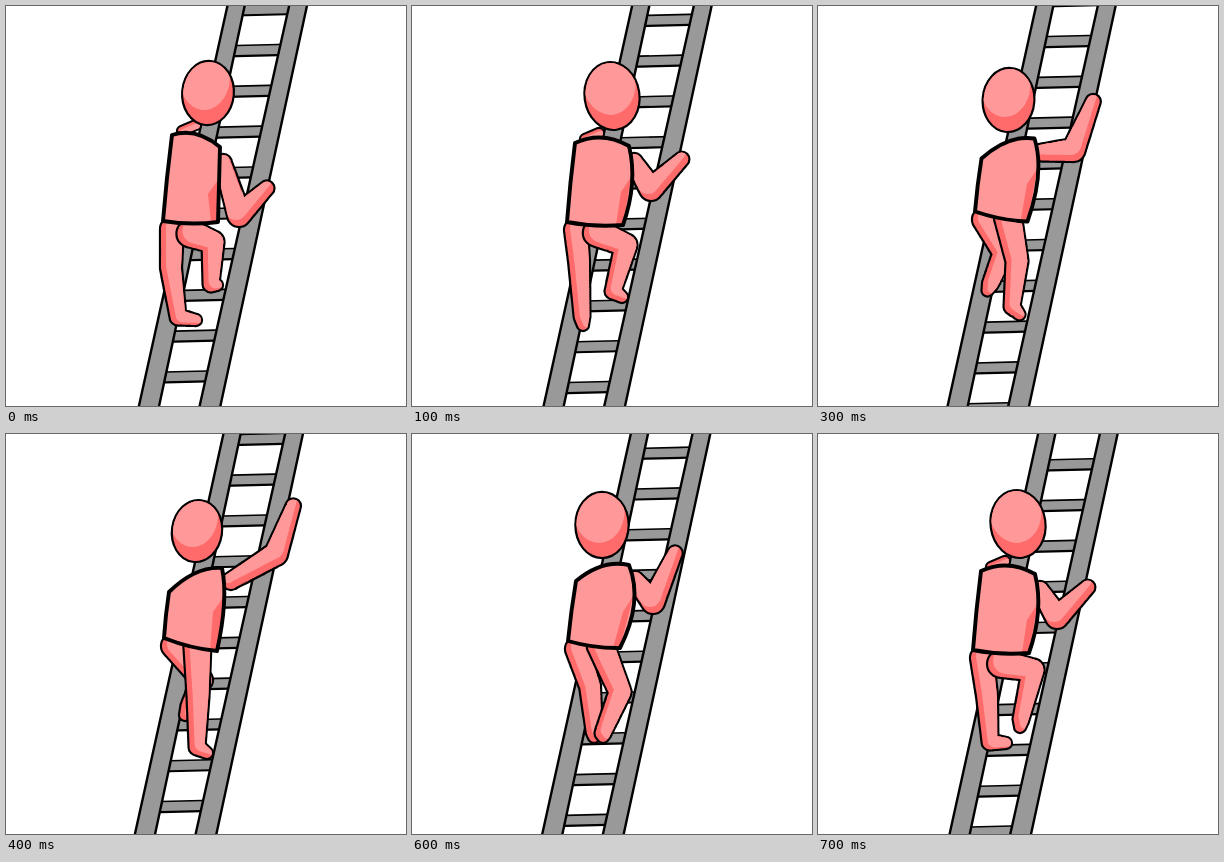
Write an HTML page that moves like this. It is 400 by 400 pixels and loops after 0.8 s.

```html
<!DOCTYPE html>
<html lang="en">
<head>
<meta charset="utf-8">
<title>Climbing a ladder</title>
<style>
  html, body { margin: 0; width: 100%; height: 100%; overflow: hidden; background: #fff; }
  #stage { position: relative; width: 400px; height: 400px; overflow: hidden; }
  #strip { position: absolute; left: 0; top: 0; display: block; animation: run .8s steps(8) infinite; }
  @keyframes run { to { transform: translateX(-3200px); } }
</style>
</head>
<body>
<div id="stage"><svg id="strip" width="3200" height="400" viewBox="0 0 3200 400" stroke-linejoin="round" stroke-linecap="round"></svg></div>
<script>
const LIGHT = '#ff9999', DARK = '#ff6a6a', GREY = '#999', INK = 4.3, GAP = 40.8;

// Upper body, from hands low to hands high.
const bodies = [
  { head: [202, 87, 31, 5], arm: [[217, 157], [233, 209], [262, 181]],
    torso: [[166, 129], [214, 141], [213, 180], [212, 216], [157, 215]] },
  { head: [200, 90, 33, -8], arm: [[222, 156], [239, 183], [271, 152]],
    torso: [[163, 137], [217, 140], [220, 178], [211, 219], [155, 216]] },
  { head: [190, 91, 32, 0], arm: [[223, 146], [241, 168], [264, 117]],
    torso: [[164, 147], [217, 131], [222, 170], [208, 214], [156, 207]] },
  { head: [191, 97, 30, 8], arm: [[225, 147], [270, 120], [288, 70]],
    torso: [[163, 158], [216, 134], [218, 170], [211, 217], [158, 204]] }
];

// Knee, ankle and toe of the left and the right leg.
const legs = [
  [[[165, 262], [172, 311], [190, 314]], [[207, 236], [205, 278], [211, 279]]],
  [[[167, 255], [170, 310], [171, 319]], [[214, 239], [201, 285], [210, 291]]],
  [[[175, 248], [162, 283], [160, 288]], [[206, 248], [197, 288], [202, 298]]],
  [[[196, 246], [183, 272], [179, 281]], [[192, 262], [191, 313], [201, 319]]],
  [[[178, 252], [182, 297], [182, 303]], [[208, 258], [191, 299], [191, 303]]],
  [[[169, 262], [172, 308], [188, 309]], [[215, 236], [203, 285], [202, 293]]]
];

let clips = 0;

// Blends numbers, or arrays and objects of them.
function mix(a, b, t) {
  if (typeof a === 'number') return a + (b - a) * t;
  if (Array.isArray(a)) return a.map((v, i) => mix(v, b[i], t));
  return Object.fromEntries(Object.keys(a).map(k => [k, mix(a[k], b[k], t)]));
}
const pose = (keys, at) => mix(keys[Math.floor(at)], keys[Math.ceil(at)], at % 1);
const move = ([x, y], dx, dy) => [x + dx, y + dy];
const line = (d, w) => `<path d="${d}" fill="none" stroke="#000" stroke-width="${w}"/>`;

// Outline, dark fill, and a shifted light copy that leaves a shaded edge.
function solid(d, dx, dy) {
  const id = 'c' + clips++;
  return `<clipPath id="${id}"><path d="${d}"/></clipPath>${line(d, INK)}<path d="${d}" fill="${DARK}"/>` +
    `<g clip-path="url(#${id})"><path d="${d}" fill="${LIGHT}" transform="translate(${dx} ${dy})"/></g>`;
}

const oval = (x, y, rx, ry, tilt = 0) => {
  const a = tilt * Math.PI / 180, c = rx * Math.cos(a), s = rx * Math.sin(a);
  return `M${x - c} ${y - s}a${rx} ${ry} ${tilt} 1 1 ${2 * c} ${2 * s}a${rx} ${ry} ${tilt} 1 1 ${-2 * c} ${-2 * s}Z`;
};

// Tapered limb: discs along the joints, merged into one silhouette.
function limb(joints, radii, dx, dy) {
  let d = '';
  for (let t = 0; t <= joints.length - 1; t += 1 / 24)
    d += oval(...pose(joints, t), pose(radii, t), pose(radii, t));
  return solid(d, dx, dy);
}

function ladder(lean, shift) {
  const left = y => 230 - .2175 * y + lean, right = y => 292 - .22 * y + lean;
  let s = '';
  for (let y = 3.5 + shift % GAP - GAP; y < 410; y += GAP) {
    const a = left(y), b = right(y);
    s += `<path d="M${a} ${y - 4.5}L${b} ${y - 6}V${y + 4.5}L${a} ${y + 6}Z" fill="${GREY}"/>` +
      line(`M${a} ${y - 4.5}L${b} ${y - 6}`, 1.6) + line(`M${a} ${y + 6}L${b} ${y + 4.5}`, 2.2);
  }
  for (const [edge, w] of [[left, 8.6], [right, 8.9]])
    s += `<path d="M${edge(-4) - w} -4h${2 * w}L${edge(404) + w + 1.5} 404h${-2 * w - 3}Z"
      fill="${GREY}" stroke="#000" stroke-width="2.4"/>`;
  return s;
}

function torso([shL, shR, waist, hipR, hipL]) {
  const top = move(mix(shL, shR, .5), 0, -14), hem = move(mix(hipL, hipR, .5), 0, 4);
  const side = mix(mix(shR, hipR, .5), waist, 2);
  const d = `M${shL}Q${top} ${shR}Q${side} ${hipR}Q${hem} ${hipL}Q${move(mix(hipL, shL, .5), -1, 0)} ${shL}Z`;
  const shade = [mix(shR, waist, .8), hipR, move(hipR, -7, 0), move(waist, -11, 8)];
  return `<path d="${d}" fill="${LIGHT}"/><path d="M${shade.join('L')}Z" fill="${DARK}"/>` + line(d, INK - .4);
}

function climber(reach, stride) {
  const body = pose(bodies, reach), [legL, legR] = pose(legs, stride);
  const [shL, , , hipR, hipL] = body.torso, [x, y, r, tilt] = body.head;
  const lift = Math.max(0, 248 - legR[0][1]);   // a raised knee swings the hip down and in
  const startL = move(hipL, 9, 8), startR = move(mix(hipL, hipR, .63), -.6 * lift, lift);
  const collar = reach < 2 ? limb([move(shL, 10, -4), move(shL, 24, -10)], [4, 4], 2, 2) : '';
  return limb([startL, ...legL], [11, 10, 7.5, 5], 5, -2) +
    limb([startR, ...legR], [13, 10.5, 7.5, 5], 5, -3) +
    limb(body.arm, [8, 11, 6.5], -3, -6) + collar + torso(body.torso) +
    solid(oval(x, y, .8 * r, r, tilt), -3, -14);
}

let cells = '';
for (let i = 0; i < 8; i++) {
  const stride = i < 2 ? i : i < 6 ? 1 + i / 2 : i - 2;   // the middle of the climb is slower
  const reach = 3 - Math.abs(3 - stride);                 // arms go up, then back down
  const shift = i < 4 ? 10.6 * i : 42.4 + 39.2 * ((i - 4) / 4) ** 1.5;
  cells += `<g transform="translate(${i * 400})">${ladder(-1.33 * reach, shift)}${climber(reach, stride)}</g>`;
}
document.getElementById('strip').innerHTML = cells;
</script>
</body>
</html>
```
